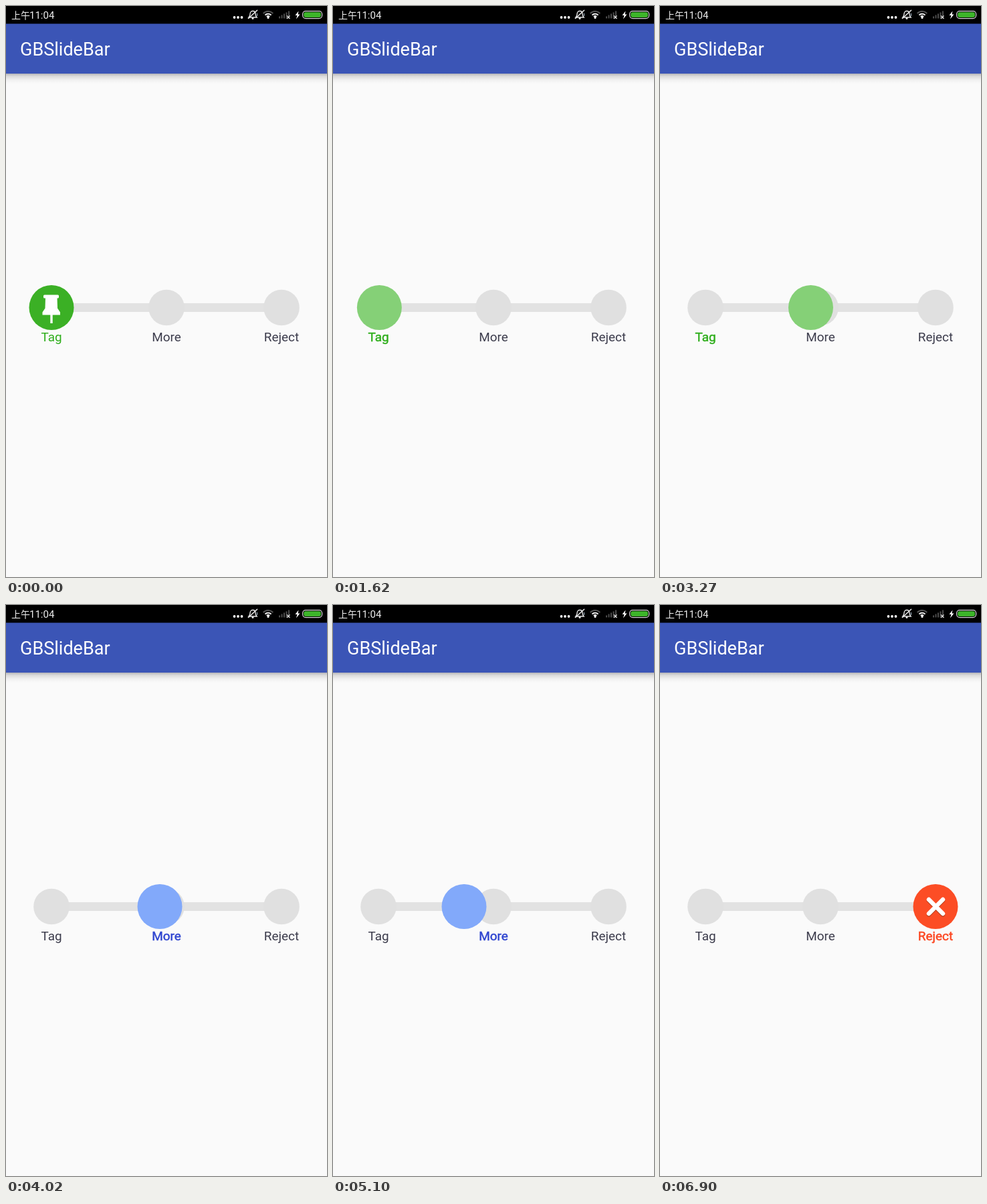
Animation, 480 px wide and 853 px high, one loop 6930 ms. Source, as an HTML page with a canvas:

```html
<!DOCTYPE html>
<html lang="en">
<head>
<meta charset="utf-8">
<title>GBSlideBar</title>
<style>
html, body { margin: 0; width: 100%; height: 100%; overflow: hidden; background: #fafafa; }
canvas { display: block; width: 480px; height: 853px; }
</style>
</head>
<body>
<canvas id="stage" width="480" height="853"></canvas>
<script>
const ctx = document.getElementById('stage').getContext('2d');
const LOOP = 6930, STEP = 30;
const BAR_Y = 450.5, DOT_R = 26.8, KNOB_R = 33.5;
const DRAG_START = 60, SETTLED = 6600;

const items = [
  { x: 68, label: 'Tag', color: '#3bb025', light: '#85d077', text: '#2fae1c', icon: drawPin },
  { x: 240, label: 'More', color: '#3b6ff0', light: '#82a9fa', text: '#2f45d0' },
  { x: 412, label: 'Reject', color: '#fc4d25', light: '#fd987c', text: '#fc4620', icon: drawCross }
];

// Knob position over time: [ms, x]
const path = [
  [0, 68], [60, 68], [430, 232], [840, 399], [920, 405], [1230, 240], [1540, 69],
  [1610, 69], [1920, 232], [2240, 404], [2490, 347], [2710, 240], [2960, 77],
  [3290, 236], [3610, 404], [4020, 230], [4300, 78], [4790, 250], [5100, 196],
  [5380, 160], [5940, 238], [6420, 403], [6600, 412], [6930, 412]
];

// Selected item over time: [ms, index]
const picks = [
  [0, 0], [430, 1], [900, 2], [1230, 1], [1530, 0], [1920, 1], [2220, 2],
  [2700, 1], [2940, 0], [3300, 1], [3600, 2], [3990, 1], [4290, 0], [4710, 1], [6390, 2]
];

function slope(i) {
  if (i === 0 || i === path.length - 1) return 0;
  const [a, b, c] = path.slice(i - 1, i + 2);
  if ((b[1] - a[1]) * (c[1] - b[1]) <= 0) return 0;
  return (c[1] - a[1]) / (c[0] - a[0]);
}

function knobX(t) {
  let i = 0;
  while (i < path.length - 2 && path[i + 1][0] <= t) i++;
  const [t0, x0] = path[i], [t1, x1] = path[i + 1];
  const d = t1 - t0, u = (t - t0) / d, s = u * u * (3 - 2 * u);
  return x0 + (x1 - x0) * s + d * u * (1 - u) * (slope(i) * (1 - u) - slope(i + 1) * u);
}

function selectedAt(t) {
  return picks.filter(p => p[0] <= t).pop()[1];
}

function rect(x, y, w, h, color) {
  ctx.fillStyle = color;
  ctx.fillRect(x, y, w, h);
}

function disc(x, y, r, color) {
  ctx.fillStyle = color;
  ctx.beginPath();
  ctx.arc(x, y, r, 0, Math.PI * 2);
  ctx.fill();
}

function poly(points, color) {
  ctx.fillStyle = color;
  ctx.beginPath();
  points.forEach(([x, y]) => ctx.lineTo(x, y));
  ctx.closePath();
  ctx.fill();
}

function line(x0, y0, x1, y1, width, color) {
  ctx.strokeStyle = color;
  ctx.lineWidth = width;
  ctx.beginPath();
  ctx.moveTo(x0, y0);
  ctx.lineTo(x1, y1);
  ctx.stroke();
}

function pill(x, y, w, h, r) {
  ctx.beginPath();
  ctx.roundRect(x, y, w, h, r);
}

function text(str, x, y, font, color, align = 'left') {
  ctx.font = font;
  ctx.textAlign = align;
  ctx.fillStyle = color;
  ctx.fillText(str, x, y);
}

function drawPin(x) {
  ctx.save();
  ctx.translate(x, BAR_Y);
  ctx.fillStyle = '#fff';
  pill(-12, -19, 23, 5, 1.5);
  ctx.fill();
  poly([[-9, -15], [8.5, -15], [9, 1], [13, 7], [13, 11], [-13.5, 11], [-13.5, 7], [-9.5, 1]], '#fff');
  rect(-1.7, 10, 3.4, 13.5, '#fff');
  ctx.restore();
}

function drawCross(x) {
  ctx.save();
  ctx.translate(x + 0.5, BAR_Y);
  ctx.lineCap = 'round';
  for (const [dy, color] of [[1.5, '#b8401f'], [0, '#fff']]) {
    line(-10.5, dy - 10.5, 10.5, dy + 10.5, 6.4, color);
    line(10.5, dy - 10.5, -10.5, dy + 10.5, 6.4, color);
  }
  ctx.restore();
}

function drawBell() {
  ctx.save();
  ctx.translate(369, 13);
  ctx.strokeStyle = '#e8e8e8';
  ctx.lineWidth = 1.4;
  ctx.beginPath();
  ctx.moveTo(-6, 4);
  ctx.quadraticCurveTo(-4, 2, -4, -1);
  ctx.bezierCurveTo(-4, -7, 4, -7, 4, -1);
  ctx.quadraticCurveTo(4, 2, 6, 4);
  ctx.closePath();
  ctx.stroke();
  disc(0, 5.6, 1.5, '#e8e8e8');
  line(-7, 6, 7, -7, 1.6, '#e8e8e8');
  line(6.5, -2, 6.5, 2, 1.2, '#9ab');
  ctx.restore();
}

function drawWifi() {
  [[11, '#555'], [7.3, '#eee'], [3.8, '#fff']].forEach(([r, color]) => {
    ctx.strokeStyle = color;
    ctx.lineWidth = 2;
    ctx.beginPath();
    ctx.arc(392, 18, r - 1, Math.PI * 1.24, Math.PI * 1.76);
    ctx.stroke();
  });
  disc(392, 17.5, 1.6, '#fff');
}

function drawSignal() {
  for (let i = 0; i < 5; i++) {
    const h = 3 + i * 2;
    rect(408 + i * 3.5, 18.5 - h, 2, h, '#4c4c4c');
  }
  line(420, 14.5, 424.5, 19, 1.2, '#ddd');
  line(424.5, 14.5, 420, 19, 1.2, '#ddd');
}

function drawBattery() {
  poly([[437.5, 7.5], [432.5, 14], [435.5, 14], [434, 19.5], [439.5, 12.5], [436.5, 12.5]], '#fff');
  ctx.strokeStyle = '#d8d8d8';
  ctx.lineWidth = 1.2;
  pill(443.6, 7.6, 29, 11, 4.5);
  ctx.stroke();
  ctx.fillStyle = '#3db52a';
  pill(445.2, 9.2, 25.8, 7.8, 3);
  ctx.fill();
}

function drawHeader() {
  rect(0, 0, 480, 27, '#000');
  text('上午', 8, 18.5, '14px "Noto Sans CJK SC", "Noto Sans CJK", sans-serif', '#eee');
  text('11:04', 35, 18.5, '15px Roboto, sans-serif', '#eee');
  [341.5, 347, 352.5].forEach(x => disc(x, 17, 1.9, '#fff'));
  drawBell();
  drawWifi();
  drawSignal();
  drawBattery();
  rect(0, 26.5, 480, 74.5, '#3b55b6');
  text('GBSlideBar', 21, 74, '27px Roboto, sans-serif', '#fff');
  const shade = ctx.createLinearGradient(0, 101, 0, 116);
  shade.addColorStop(0, '#b4b4b8');
  shade.addColorStop(0.25, '#dadada');
  shade.addColorStop(0.6, '#efefef');
  shade.addColorStop(1, '#fafafa');
  rect(0, 101, 480, 15, shade);
}

function drawLabel(item, active, moving) {
  const font = '18.9px Roboto, sans-serif';
  text(item.label, item.x, 500.5, font, active ? item.text : '#3c3c4c', 'center');
  if (active && moving) {
    ctx.strokeStyle = item.text;
    ctx.lineWidth = 0.5;
    ctx.strokeText(item.label, item.x, 500.5);
  }
}

function drawSlider(t) {
  const picked = selectedAt(t), item = items[picked], x = knobX(t);
  const moving = t >= DRAG_START && t < SETTLED;
  rect(68, 444, 344, 13, '#e2e2e2');
  items.forEach(it => disc(it.x, BAR_Y, DOT_R, '#e0e0e0'));
  disc(x, BAR_Y, KNOB_R, moving ? item.light : item.color);
  if (!moving && item.icon) item.icon(x);
  items.forEach((it, i) => drawLabel(it, i === picked, moving || i === 2));
}

const start = performance.now();
function frame() {
  const elapsed = (performance.now() - start) % LOOP;
  const t = Math.floor(elapsed / STEP) * STEP;
  rect(0, 0, 480, 853, '#fafafa');
  drawHeader();
  drawSlider(t);
  requestAnimationFrame(frame);
}
frame();
</script>
</body>
</html>
```
